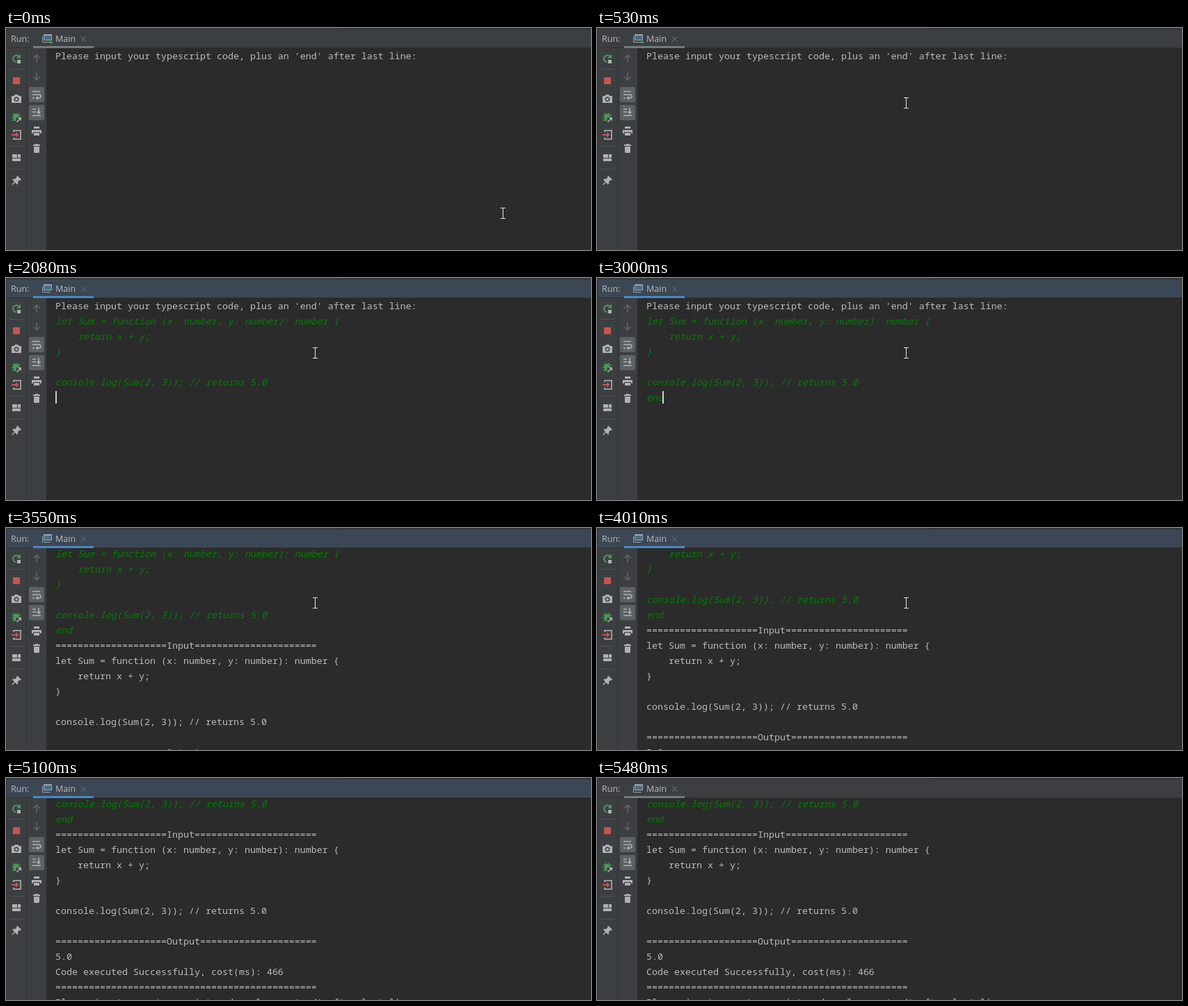
Write an HTML page that moves like this. It is 841 px wide and 320 px high and loops after 5940 ms.

```html
<!DOCTYPE html>
<html lang="en">
<head>
<meta charset="utf-8">
<title>Console run</title>
<style>
  html, body { margin: 0; width: 100%; height: 100%; overflow: hidden; background: #2b2b2b; }
  svg { display: block; }
  .ui { font: 12.5px "Open Sans", "Noto Sans", sans-serif; fill: #bbb; }
  #console text { fill: #bbb; white-space: pre; font-variant-ligatures: none; }
  #console .typed { fill: #007f00; font-style: italic; }
  .g { fill: #afb1b3; }
  .gs { fill: none; stroke: #afb1b3; stroke-width: 1.6; }
  .off { fill: none; stroke: #616466; stroke-width: 1.6; }
  .green { fill: #499c54; }
  .rule { fill: #515456; }
</style>
</head>
<body>
<svg width="841" height="320" viewBox="0 0 841 320">
  <defs><clipPath id="pane"><rect x="59" y="29" width="782" height="291"/></clipPath></defs>
  <rect width="841" height="320" fill="#2b2b2b"/>

  <g clip-path="url(#pane)">
    <g id="console"></g>
    <rect id="caret" width="2" height="18" fill="#d0d0d0"/>
  </g>

  <!-- header -->
  <rect width="841" height="1" fill="#3c3f41"/>
  <rect x="480" width="361" height="1" fill="#333537"/>
  <rect y="1" width="841" height="1" fill="#323232"/>
  <rect id="header" x="1" y="2" width="840" height="26"/>
  <rect y="28" width="841" height="1" fill="#323232"/>
  <rect id="underline" x="39" y="26" width="87" height="3"/>
  <text class="ui" x="7" y="20">Run:</text>
  <text class="ui" x="71" y="20">Main</text>
  <path id="close" d="M108 12.5l7 7m0-7l-7 7" fill="none" stroke-width="1.1"/>
  <path d="M54.5 9.5h11v8h-11z" fill="#45708a" stroke="#9aa7b0"/>
  <path d="M54 9h12v2h-12z" fill="#9aa7b0"/>
  <path d="M52.5 12v8.5h11" fill="none" stroke="#9aa7b0"/>
  <circle id="live" cx="65" cy="20.5" r="1.8" fill="#25c43a"/>

  <!-- tool columns -->
  <rect y="29" width="58" height="291" fill="#3c3f41"/>
  <rect width="1" y="2" height="318" fill="#323232"/>
  <rect x="29" y="29" width="1" height="291" fill="#323436"/>
  <g class="rule">
    <rect x="5" y="59" width="20" height="1"/>
    <rect x="5" y="170" width="20" height="1"/>
    <rect x="5" y="203" width="20" height="1"/>
  </g>

  <!-- rerun -->
  <path d="M18.5 40.7A5 5 0 1 0 14.5 49.3" fill="none" stroke="#499c54" stroke-width="2"/>
  <path class="green" d="M21 37.5v6h-6z"/>
  <rect class="g" x="16" y="46" width="5" height="5"/>
  <!-- stop -->
  <rect x="10" y="71" width="10" height="10" fill="#c75450"/>
  <!-- camera -->
  <path class="g" fill-rule="evenodd" d="M8 98h3.5l1.2-2h4.6l1.2 2H22v10H8zM15 99.3a3.5 3.5 0 1 0 .01 0z"/>
  <circle class="g" cx="15" cy="102.8" r="1.9"/>
  <!-- debugger -->
  <ellipse class="green" cx="14.5" cy="129" rx="4" ry="5.2"/>
  <path d="M11.5 122.5l1.5 2.5m4.500-2.500l-1.500 2.500M9 125.500h12M8.500 129h12M9 133h4" fill="none" stroke="#499c54" stroke-width="1.4"/>
  <path d="M14.5 129h8v7h-8z" fill="#3c3f41"/>
  <path class="gs" d="M15.5 135.5l5-5"/>
  <path class="g" d="M17 129h5v5z"/>
  <!-- exit -->
  <path class="gs" d="M11 150v-2.2h10v12.4h-10v-2.2"/>
  <path d="M8 154h8" fill="none" stroke="#c75450" stroke-width="2"/>
  <path d="M14 150l4.5 4l-4.5 4z" fill="#c75450"/>
  <!-- layout -->
  <path class="g" d="M9 182h7v5H9zM17 182h4v5h-4zM9 188h12v4H9z"/>
  <!-- pin -->
  <path class="g" d="M16.5 213l5.5 5.5-1.3 1.2-1.2-.4-2.5 2.5.2 2.6-1.2 1.3-3-3-3.8 3.9-1-1 3.9-3.8-3-3 1.3-1.2 2.6.2 2.5-2.5-.4-1.2z"/>

  <!-- second column -->
  <path class="off" d="M44 50v-11M39.5 43.5l4.5-4.5 4.5 4.5"/>
  <path class="off" d="M44 64v11M39.5 70.5l4.5 4.5 4.5-4.5"/>
  <rect x="33" y="85" width="22" height="22" rx="2" fill="#5c6164"/>
  <rect x="33" y="111" width="22" height="22" rx="2" fill="#5c6164"/>
  <path class="gs" d="M38 91.5h11M38 96h9.5a2.5 2.5 0 0 1 0 5h-2M38 101h3"/>
  <path class="g" d="M46 98v6l-3.5-3z"/>
  <path class="gs" d="M38 117h5M38 121h5M38 126.2h12M47 115v7"/>
  <path class="g" d="M43.8 120.5h6.4l-3.2 4z"/>
  <path class="g" d="M40 142h8v3h-8zM37 147h14v5h-2v-2H39v2h-2zM40 151h8v4h-8z"/>
  <path class="g" d="M42 167h4v1h3v2h-10v-2h3zM40 171h8v7.5q0 1.5-1.5 1.5h-5q-1.5 0-1.5-1.5z"/>

  <path id="pointer" d="M-3 -7.5h7M-3 7.5h7M.5 -7.5v15" fill="none" stroke="#e6e6e6"/>
</svg>

<script>
const LOOP = 5940, LEFT = 71, LINE = 22, ADVANCE = 8;
const MONO = '"Noto Sans Mono", "DejaVu Sans Mono", monospace';
const $ = id => document.getElementById(id);

const prompt = "Please input your typescript code, plus an 'end' after last line:";
const code = [
  'let Sum = function (x: number, y: number): number {',
  '    return x + y;',
  '}',
  '',
  'console.log(Sum(2, 3)); // returns 5.0'
];
const bar = n => '='.repeat(n);
const lines = [
  prompt, ...code, 'end',
  bar(20) + 'Input' + bar(22), ...code, '',
  bar(20) + 'Output' + bar(21),
  '5.0',
  'Code executed Successfully, cost(ms): 466',
  bar(47),
  prompt
];
const END_ROW = 6, FULL_ROW = 14;

// start time, last visible row, caret row and column
const states = [
  { at: 0, last: 0 },
  { at: 600, last: 0, caret: [1, 0] },
  { at: 1070, last: 5, caret: [5, 38] },
  { at: 2080, last: 5, caret: [6, 0] },
  { at: 2460, last: 6, caret: [6, 1] },
  { at: 2920, last: 6, caret: [6, 2] },
  { at: 3000, last: 6, caret: [6, 3] },
  { at: 3400, last: 6, caret: [7, 0] },
  { at: 3550, last: 14 },
  { at: 4010, last: 15 },
  { at: 4090, last: 18 }
];

// font size that gives the console's cell width
function cellFontSize() {
  const ctx = document.createElement('canvas').getContext('2d');
  ctx.font = '100px ' + MONO;
  return ADVANCE * 100 / ctx.measureText('0').width;
}

const fontSize = cellFontSize();
const rows = lines.map((line, i) => {
  const row = document.createElementNS('http://www.w3.org/2000/svg', 'text');
  row.setAttribute('x', LEFT);
  row.setAttribute('y', 45 + i * LINE);
  row.style.fontFamily = MONO;
  row.style.fontSize = fontSize + 'px';
  if (i > 0 && i <= END_ROW) row.setAttribute('class', 'typed');
  row.textContent = line;
  $('console').append(row);
  return row;
});

const show = (el, on) => el.setAttribute('visibility', on ? 'visible' : 'hidden');
const smooth = u => u * u * (3 - 2 * u);
const start = [714, 267], rest = [444, 108], exit = [812, 288];
const between = (a, b, u) => a.map((v, i) => Math.round(v + (b[i] - v) * u));

// The pointer moves in discrete steps
function pointerAt(t) {
  if (t < 70) return start;
  if (t < 600) return between(start, rest, smooth(Math.min(1, (Math.floor((t - 70) / 75.7) + 1) / 7)));
  if (t < 4790) return rest;
  if (t < 5100) return between(rest, exit, ((Math.floor((t - 4790) / 77.5) + 1) / 4) ** 1.3);
  return null;
}

function render(t) {
  const { last, caret } = states.findLast(s => t >= s.at);
  const scroll = last < FULL_ROW ? 0 : 25 + (last - FULL_ROW) * LINE;
  rows.forEach((row, i) => show(row, i <= last));
  $('console').setAttribute('transform', `translate(0 ${-scroll})`);

  const typing = caret && caret[0] === END_ROW;
  const word = typing ? 'end'.slice(0, caret[1]) : 'end';
  if (rows[END_ROW].textContent !== word) rows[END_ROW].textContent = word;

  show($('caret'), caret);
  if (caret) {
    $('caret').setAttribute('x', Math.max(LEFT, LEFT + caret[1] * ADVANCE - 1));
    $('caret').setAttribute('y', 31 + caret[0] * LINE);
  }

  const focused = t >= 600 && t < 5480;
  $('header').setAttribute('fill', focused ? '#3b4754' : '#3c3f41');
  $('underline').setAttribute('fill', focused ? '#4a88c7' : '#747a80');
  $('close').setAttribute('stroke', focused ? '#566270' : '#626567');
  show($('live'), t < 600);

  const spot = pointerAt(t);
  show($('pointer'), spot);
  if (spot) $('pointer').setAttribute('transform', `translate(${spot})`);
}

const began = performance.now();
function tick() {
  render((performance.now() - began) % LOOP);
  requestAnimationFrame(tick);
}
tick();
</script>
</body>
</html>
```
